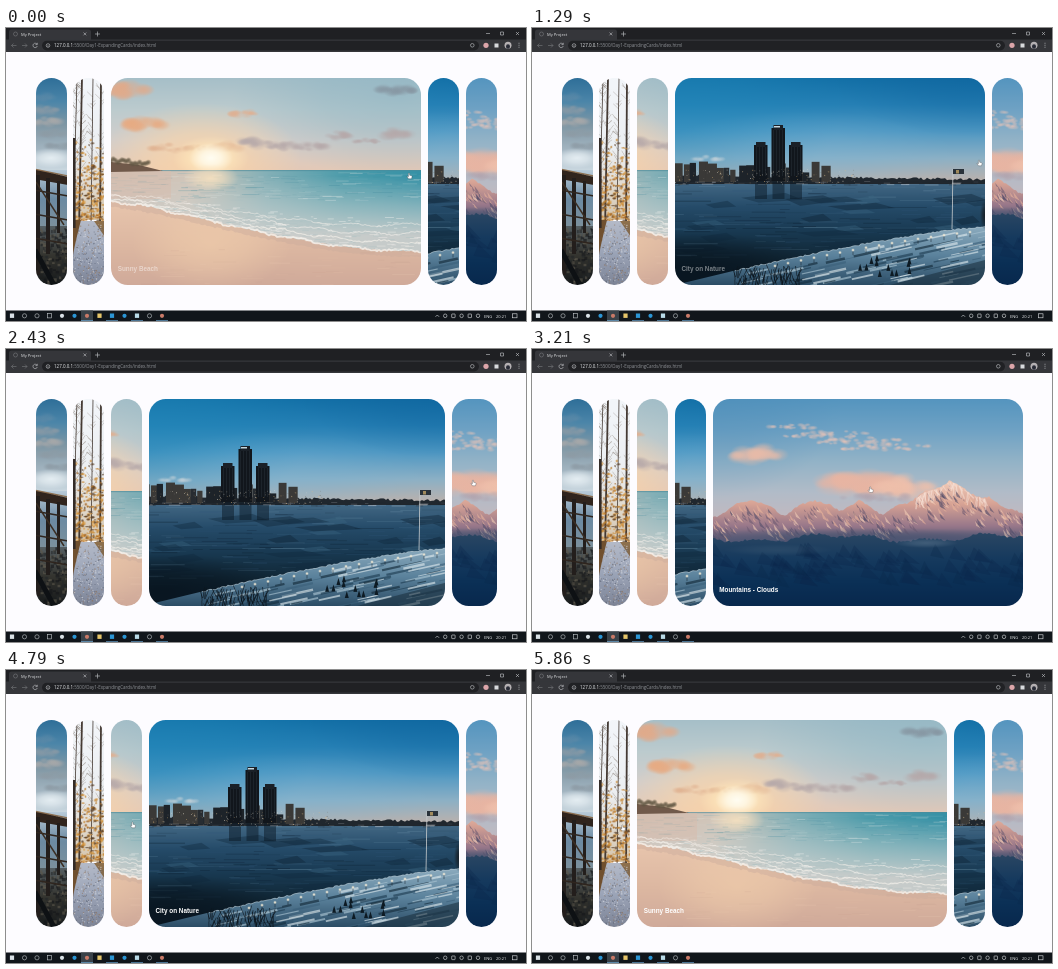
Write an HTML page with a canvas that moves like this. It is 520x293 px and loops after 5930 ms.

```html
<!DOCTYPE html>
<html lang="en">
<head>
<meta charset="utf-8">
<title>My Project</title>
<style>
  html, body { margin: 0; width: 100%; height: 100%; overflow: hidden; background: #fdfcff; }
  #stage { position: relative; width: 520px; height: 293px; overflow: hidden; }
  #stage > svg { position: absolute; left: 0; top: 0; }
  .panel { position: absolute; top: 50px; height: 207px; border-radius: 16.9px; overflow: hidden; }
  .panel canvas { position: absolute; left: 50%; margin-left: -155px; top: 0; width: 310px; height: 207px; }
  .panel h3 {
    position: absolute; left: 6.6px; top: 186.6px; margin: 0; color: #fff;
    font: bold 6.36px/7.4px "Liberation Sans", Arial, sans-serif; white-space: nowrap;
  }
  svg text { font-family: "Open Sans", "Noto Sans", sans-serif; }
</style>
</head>
<body>
<div id="stage">
  <svg width="520" height="293" fill="none" stroke-width=".6">
    <rect width="520" height="12" fill="#1f2023"/>
    <rect x="3" y="1.5" width="82" height="13" rx="2.5" fill="#35363a"/>
    <rect y="11.5" width="520" height="12.5" fill="#35363a"/>
    <rect x="36" y="12.8" width="437" height="9.6" rx="4.8" fill="#202124"/>
    <g stroke="#c4c6c9">
      <path d="M77.5 4.5l2.8 2.8m0-2.8l-2.8 2.8M89 6h5M91.5 3.500v5M480 5.500h4M494.500 4h3v3h-3zM510 4l3 3m0-3l-3 3"/>
      <path d="M31 16.200a2.200 2.200 0 1 0 .3 1.800M31.300 14.800v1.800h-1.800"/>
      <circle cx="42" cy="17.5" r="1.8"/><path d="M42 17.2v1.4"/>
      <circle cx="466.300" cy="17.300" r="1.800"/>
    </g>
    <g stroke="#77797d">
      <path d="M10.500 17.500h-5m2-2l-2 2 2 2M16 17.500h5m-2-2l2 2-2 2"/>
      <circle cx="9.5" cy="6" r="2"/>
    </g>
    <text x="15" y="7.7" font-size="4.1" fill="#e4e5e7">My Project</text>
    <text x="48" y="19.1" font-size="4.5" fill="#8f9297"><tspan fill="#eceef0">127.0.0.1</tspan>:5500/Day1-ExpandingCards/index.html</text>
    <circle cx="480" cy="17.3" r="2.6" fill="#dca6aa"/>
    <path d="M488.500 15.500h4v4h-4z" fill="#d8dadd"/>
    <circle cx="502" cy="17.3" r="3.5" fill="#b5b1b3"/><ellipse cx="502" cy="18.500" rx="2" ry="2.300" fill="#282b36"/>
    <path d="M513 14.800v5" stroke="#d8dadd" stroke-width=".8" stroke-dasharray=".8 1.2"/>
    <rect y="282.5" width="520" height="10.5" fill="#11161b"/>
    <g id="tasks"></g>
    <g font-size="4" fill="#eceef0"><text x="478" y="289.5">ENG</text><text x="490" y="289.5">20:21</text></g>
  </svg>
</div>

<script>
const LOOP = 5930, W = 310, H = 207, THIN = 31, LEFT = 29.5, GAP = 6.8, GROW = 500;
let g, seed;

function rand(a = 0, b = 1) {
  seed = (seed * 16807) % 2147483647;
  return a + (b - a) * seed / 2147483647;
}
const pick = list => list[Math.floor(rand(0, list.length))];
const times = (n, fn) => { for (let i = 0; i < n; i++) fn(i); };
const { sin, abs, max, min } = Math;

// ---- painting helpers ----
function band(y0, y1, ...colors) {
  rect(0, y0, W, y1 - y0, shade(0, y0, 0, y1, colors));
}
function shade(x0, y0, x1, y1, colors) {
  const paint = g.createLinearGradient(x0, y0, x1, y1);
  colors.forEach((c, i) => paint.addColorStop(i / (colors.length - 1), c));
  return paint;
}
function rect(x, y, w, h, fill, alpha = 1) {
  g.globalAlpha = alpha; g.fillStyle = fill; g.fillRect(x, y, w, h);
}
function poly(points, fill, alpha = 1) {
  g.globalAlpha = alpha; g.fillStyle = fill; g.beginPath();
  points.forEach(p => g.lineTo(...p));
  g.fill();
}
function line(points, color, width, alpha = 1) {
  g.globalAlpha = alpha; g.strokeStyle = color; g.lineWidth = width; g.beginPath();
  points.forEach(p => g.lineTo(...p));
  g.stroke();
}
function soft(x, y, rx, ry, color, alpha = 1) {
  g.save(); g.translate(x, y); g.scale(rx, ry); g.globalAlpha = alpha;
  const paint = g.createRadialGradient(0, 0, 0, 0, 0, 1);
  paint.addColorStop(0, color); paint.addColorStop(.45, color + 'b0'); paint.addColorStop(1, color + '00');
  g.fillStyle = paint; g.fillRect(-1, -1, 2, 2); g.restore();
}
function cloud(x, y, w, h, color, alpha = .5) {
  times(20, () => {
    const u = rand(-1, 1), r = h * rand(.3, .65);
    soft(x + u * w, y + rand(-.6, .4) * h * (1 - u * u), r * 1.8, r, color, alpha);
  });
}
function edge(height, rough, from = 0) {
  const points = [];
  for (let x = from; x <= W; x += 2) points.push([x, height(x) + rand(-rough, rough)]);
  return points;
}
const below = points => [...points, [W, H], [0, H]];
function streaks(n, top, bottom, length, colors, alpha) {
  times(n, () => rect(rand(-20, W), rand(top, bottom), rand(.2, 1) * length, rand(.4, 1), pick(colors), rand(.2, 1) * alpha));
}
function specks(n, x0, x1, y0, y1, size, colors, alpha = .7) {
  times(n, () => rect(rand(x0, x1), rand(y0, y1), size * rand(.4, 1), size * rand(.4, 1), pick(colors), alpha));
}

// ---- scenes ----
function pier() {
  band(0, 95, '#2f6f99', '#4c86a9', '#8097a4', '#a3b5c1', '#cfdce4');
  times(5, i => cloud(155 + rand(-9, 9), 20 + i * 12, 14, 7, pick(['#a9a9aa', '#8d9ba5', '#5b89a8']), .4));
  soft(155, 80, 24, 10, '#eaf2f6', .9);
  band(92, 150, '#b9cbd9', '#6c8aa2', '#7d919d');
  band(148, H, '#555e62', '#34342f', '#15181a');
  specks(180, 138, 172, 148, H, 4, ['#141719', '#5d574c', '#25282a'], .6);
  poly([[138, 91], [172, 99], [172, 107], [138, 101]], '#30241d');
  line([[138, 91], [172, 98]], '#8a6c4d', 1.3);
  times(3, i => rect(139 + i * 11, 97 + i * 3, 5 - i, 100 - i * 24, '#231e1c'));
  times(3, i => line([[138, 112 + i * 24], [172, 118 + i * 24]], '#2f251e', 1.6));
  line([[140, 104], [168, 147]], '#3a2d22', 1.6);
  line([[139, 172], [158, H]], '#0e1114', 5);
}

function forest() {
  band(0, 142, '#f3f6fa', '#eceff2', '#d5c5ad');
  const trunks = [139, 145, 157, 166];
  trunks.forEach((x, i) => line([[x + 4 - i, 0], [x, 150]], '#443a34', .8 + i % 2));
  times(150, () => {
    const x = pick(trunks) + 2, y = rand(5, 115), reach = rand(-7, 7);
    line([[x, y], [x + reach, y - abs(reach) * rand(.6, 1.8)]], '#66584c', .35, .7);
  });
  times(420, () => {
    const y = rand(62, 145);
    if (rand() < (y - 50) / 70) soft(rand(137, 173), y, rand(1, 2.8), rand(.8, 2.2), pick(['#c6842d', '#a3621f', '#dda04a', '#5b4027']), .85);
  });
  band(143, H, '#8f714c', '#705d4e', '#54514e');
  poly([[146, 143], [160, 143], [175, 165], [175, H], [134, H], [140, 172]], shade(0, 143, 0, H, ['#b4bac8', '#9ba4b7', '#7d8496']));
  specks(300, 138, 172, 146, H, 1.5, ['#dfe2e6', '#59606e', '#8f745c'], .6);
  poly([[138, 142], [147, 142], [138, 178]], '#70502f');
  rect(139, 60, 2.6, 90, '#332b27');
}

function beach() {
  band(0, 94, '#a6bfc8', '#bccbce', '#d3cecb', '#e5c9b6');
  soft(290, 20, 170, 80, '#85b1c2', .5);
  soft(90, 80, 100, 55, '#ffd6a6', .8);
  cloud(17, 13, 18, 13, '#e1aa8a'); cloud(31, 47, 19, 11, '#e7ab83');
  cloud(285, 12, 18, 9, '#8594a0', .4); cloud(133, 36, 13, 6, '#dfb092', .45);
  times(9, i => cloud(60 + i * 28, 76 - i * 2 + rand(-6, 3), rand(9, 20), rand(4, 9), i < 3 ? '#dfb08f' : '#b5a8a9', .4));
  soft(100, 80, 38, 22, '#ffeabf'); soft(100, 80, 22, 15, '#fffdf2');

  band(92, H, '#ecc9ae', '#e6c3ab', '#dcb7a1', '#d0aa9a');
  soft(100, 165, 80, 50, '#f2cfac', .6);
  const shore = x => 123 + 50 * sin(x / W * Math.PI / 2) ** 1.3;
  const wash = edge(shore, .9);
  poly([...wash.map(([x, y]) => [x, y + 6]), [W, 92], [0, 92]], '#c9aa9c', .45);
  const sea = [...wash, [W, 92], [0, 92]];
  poly(sea, shade(0, 0, W, 0, ['#cfbeb2', '#d0c5b9', '#84b0b7', '#4d9cab', '#3591a6']));
  poly(sea, shade(0, 98, 0, 158, ['#d8d6d200', '#cdd2d080', '#d9d3cfe0']));
  rect(50, 92, 260, 1.2, '#4c8b9a', .6);
  streaks(260, 94, 122, 20, ['#40889a', '#dfe6e4', '#79a9b2'], .4);
  rect(0, 93, 60, 28, '#d7bfb0', .6);
  soft(100, 100, 28, 14, '#ffe5c0', .8);
  times(4, i => line(wash.map(([x, y]) => [x, y - i * 7 * (.3 + x / W) + 1.3 * sin(x / 8 + i * 2)]), '#f6f1eb', i ? 1 : 1.8, .85 - i * .12));
  times(260, () => {
    const x = rand(40, W), lift = rand() ** 1.5 * 28;
    rect(x, shore(x) - lift * (.3 + x / W), rand(2, 9), .8, pick(['#fbf8f3', '#f4efea', '#a9bfc1']), .45);
  });
  poly([[0, 84], [28, 87], [52, 93], [0, 94]], '#70594a');
  times(18, i => soft(i * 2.2, 84 + i * .25 - rand(0, 4), 3, 3, '#5f5541', .9));
  streaks(60, 170, H, 25, ['#bd9788', '#eccbb2'], .25);
}

function city() {
  band(0, 107, '#1370a7', '#2680b5', '#4f98c3', '#8cb0c5', '#c3b2a9');
  soft(0, 25, 170, 100, '#2089ba', .5); soft(130, 78, 150, 45, '#79b5d6', .35); soft(W, 0, 150, 60, '#0d5d98', .4);
  cloud(33, 81, 14, 5, '#c9d3d9', .3);

  band(103, H, '#456a86', '#254b69', '#183850', '#112736', '#0b1a26');
  streaks(170, 106, 190, 40, ['#6c91a9', '#0c1f30', '#31587a'], .45);
  times(26, () => {
    const x = rand(-10, W), y = rand(118, 180), w = rand(15, 50);
    poly([[x, y], [x + w, y - rand(2, 5)], [x + w * 1.4, y + 2], [x + w * .4, y + rand(3, 7)]], pick(['#0d2132', '#10293d', '#3b6481']), .4);
  });
  soft(20, 190, 130, 35, '#07121c', .75);

  poly([...edge(x => 97 + x / 70, 1.3), [W, 106], [0, 106]], '#20272e');
  for (let x = 0; x < 155; x += rand(5, 12)) {
    const top = rand(83, 95);
    rect(x, top, rand(5, 12), 104 - top, pick(['#272c31', '#3a3937', '#1d2329']));
  }
  times(3, i => {
    const x = 79 + i * 17.5, top = i === 1 ? 47 : 64;
    rect(x, top + 3, 13.5, 100 - top, '#11161c'); rect(x + 2, top, 9.5, 5, '#1a2027');
    times(4, j => rect(x + 2 + j * 3, top + 5, .4, 93 - top, '#3a4650', .7));
    rect(x + 1, 103, 12, 18, '#0b1924', .5);
  });
  rect(99, 48, 6, 1.5, '#c7d8df');
  specks(150, 0, 180, 91, 106, 1, ['#e3b97c', '#75716b', '#f2e8d6'], .7);
  streaks(60, 103, 107, 14, ['#d9dce0', '#1b242c'], .6);

  const bank = x => 149 + 58 * (1 - x / W) ** 1.3;
  const snow = edge(bank, .8, 60);
  g.save(); g.beginPath(); below(snow).forEach(p => g.lineTo(...p)); g.clip();
  band(148, H, '#8dacbf', '#5b829c', '#2c4d66');
  times(150, () => {
    const x = rand(50, W), y = bank(x) + rand(5, 58), w = rand(8, 32);
    line([[x, y], [x + w, y - w * .22]], pick(['#152b3b', '#1f3e54', '#a9c3d1', '#dbe6eb', '#3d627b']), rand(.6, 2.6), .65);
  });
  poly([[215, H], [W, 182], [W, H]], '#1d3242', .6);
  g.restore();
  line(snow, '#bccfd9', .8, .7);
  times(16, i => {
    const x = 100 + i * 13, y = bank(x) + 4;
    line([[x, y + 5], [x, y]], '#17232d', .5); soft(x, y, 1.8, 1.8, '#fff4dc');
  });
  times(90, () => {
    const x = rand(60, 125), y = rand(192, H);
    line([[x, y + 5], [x + rand(-5, 5), y - rand(2, 7)]], '#0c151d', .7, .8);
  });
  times(12, () => { const x = rand(185, 235), y = rand(180, 200); poly([[x, y - 5], [x + 2, y + 2], [x - 2, y + 2]], '#0d1a23'); });
  line([[278, 91], [277, 151]], '#c7cbcd', .8);
  rect(278, 91, 11, 5, '#29323a'); rect(281, 92, 3, 3.5, '#a08a5c');
  soft(W, 137, 5, 15, '#172028');
}

function mountains() {
  band(0, 125, '#5595bf', '#6fa2c4', '#93b3c7', '#b2bcc8', '#c5b8be');
  soft(0, 0, 130, 100, '#4a8bb7', .4);
  times(7, i => cloud(90 + i * 15, 28 + i * 3.2 + (i % 2) * 6, 36, 4, '#e6c3b8', .5));
  cloud(45, 57, 24, 13, '#e8bba8', .55);
  times(4, i => cloud(132 + i * 20, 85 + rand(-4, 4), 24, 16, pick(['#e8b4a2', '#efc0ab']), .45));
  cloud(168, 99, 40, 7, '#b0a3ae', .4);

  const peaks = [[38, 18], [102, 17], [145, 15], [236, 35], [275, 18]];
  const ridge = x => 117 - max(0, ...peaks.map(([c, h]) => h - .5 * abs(x - c))) + 1.5 * sin(x / 5);
  poly(below(edge(ridge, 1)), shade(0, 84, 0, 148, ['#efc8b5', '#d6a294', '#99788a', '#3c4d6e']));
  times(330, () => {
    const x = rand(-5, W), y = ridge(x) + rand(2, 26), s = rand(2, 9);
    poly([[x, y], [x + s * .9, y + s * 1.2], [x + s * .2, y + s * .8]], pick(['#514d69', '#eab49b', '#6c5a72', '#f3cdb6']), .6);
  });
  times(60, () => {
    const x = 236 + rand(-32, 40), y = ridge(x);
    line([[x, y + 1], [x + rand(-4, 6), y + rand(4, 14)]], '#f6dfd3', rand(.5, 1.6), .55);
  });
  const hills = x => 139 + 3 * sin(x / 26) + 2 * sin(x / 9);
  soft(155, 138, 200, 9, '#3b4e6c', .6);
  poly(below(edge(hills, 1.3)), shade(0, 135, 0, H, ['#2a4663', '#163a5e', '#0b3056', '#08284d']));
  times(70, () => {
    const x = rand(0, W), y = rand(143, 175);
    poly([[x, y], [x + rand(8, 20), y + 15], [x - 5, y + 12]], '#0b274a', .3);
  });
  soft(213, 144, 32, 5, '#7890a5', .35); soft(65, 151, 55, 6, '#46627c', .3);
}

// ---- taskbar ----
const svg = markup => document.getElementById('tasks').insertAdjacentHTML('beforeend', markup);
const RED = '#c97a68', PALE = '#d9e1e6', SKY = '#2b95d4';
svg('<rect x="75" y="282.5" width="12" height="10.5" fill="#3a4249"/>');
[PALE, '', '', '', PALE, SKY, RED, '#e6c56a', SKY, SKY, '#b9dbe8', '', RED].forEach((color, i) => {
  const x = 6 + i * 12.5, square = [0, 3, 7, 8, 10].includes(i);
  const paint = color ? `fill="${color}"` : 'stroke="#c3c8cc"';
  svg(square ? `<rect x="${x - 2.1}" y="285.5" width="4.2" height="4.4" ${paint}/>` : `<circle cx="${x}" cy="287.8" r="2.1" ${paint}/>`);
  if (color && i > 5 && i % 2 === 0) svg(`<path d="M${x - 6} 292.5h12" stroke="#72b4e4"/>`);
});
svg('<path d="M429.500 288.800l1.800-1.800 1.800 1.800" stroke="#dfe2e5"/>');
times(5, i => svg(`<rect x="${437.500 + i * 8.2}" y="286" width="3.4" height="3.6" rx="${i % 2 ? .4 : 1.7}" stroke="#dfe2e5"/>`));
svg('<rect x="506.500" y="285.800" width="4.500" height="4" stroke="#dfe2e5"/>');

// ---- panels ----
const stage = document.getElementById('stage');
const scenes = [[pier, ''], [forest, ''], [beach, 'Sunny Beach'], [city, 'City on Nature'], [mountains, 'Mountains - Clouds']];
const panels = scenes.map(([paint, title], i) => {
  const box = document.createElement('div'), canvas = document.createElement('canvas'), label = document.createElement('h3');
  box.className = 'panel';
  canvas.width = W * 2; canvas.height = H * 2;
  g = canvas.getContext('2d'); g.scale(2, 2); seed = 4211 + i * 97;
  paint();
  label.textContent = title;
  box.append(canvas, label);
  stage.append(box);
  return { box, label };
});

stage.insertAdjacentHTML('beforeend', `<svg id="hand" width="8" height="9" overflow="visible">
  <path d="M-.6 .4Q0-.4 .6 .4V2.200L2.700 2.800Q3.200 3 3 4L2.500 5.800H-.5L-2 3.800Q-2 3-1.200 3.400L-.6 3.800Z" fill="#fff" stroke="#3a3f45" stroke-width=".35"/></svg>`);
const hand = document.getElementById('hand');

// ---- motion ----
const clicks = [[-590, 2], [700, 3], [2345, 4], [4050, 3], [4900, 2]];
const pointer = [[0, 403, 145], [1290, 447, 132], [2100, 467, 131], [2700, 467, 131], [3850, 158, 147], [4700, 127, 152], [LOOP, 90, 155]];
const easeIn = p => min(1, max(0, p)) ** 1.7;
const glide = p => p * p * (3 - 2 * p);

function render(t) {
  const n = clicks.findLastIndex(([time]) => time <= t);
  const [since, active] = clicks[n], previous = n ? clicks[n - 1][1] : -1;
  const grown = easeIn((t - since) / GROW);
  let x = LEFT;
  panels.forEach(({ box, label }, i) => {
    const share = i === active ? grown : i === previous ? 1 - grown : 0;
    const width = THIN + (W - THIN) * share;
    box.style.left = x + 'px';
    box.style.width = width + 'px';
    label.style.opacity = i === active ? easeIn((t - since - 400) / 300) : 0;
    x += width + GAP;
  });
  const k = pointer.findIndex(([time]) => time > t), [a, b] = [pointer[k - 1], pointer[k]];
  const p = glide((t - a[0]) / (b[0] - a[0]));
  hand.style.transform = `translate(${a[1] + (b[1] - a[1]) * p}px, ${a[2] + (b[2] - a[2]) * p}px)`;
}

const start = performance.now();
function tick() {
  render((performance.now() - start) % LOOP);
  requestAnimationFrame(tick);
}
tick();
</script>
</body>
</html>
```
